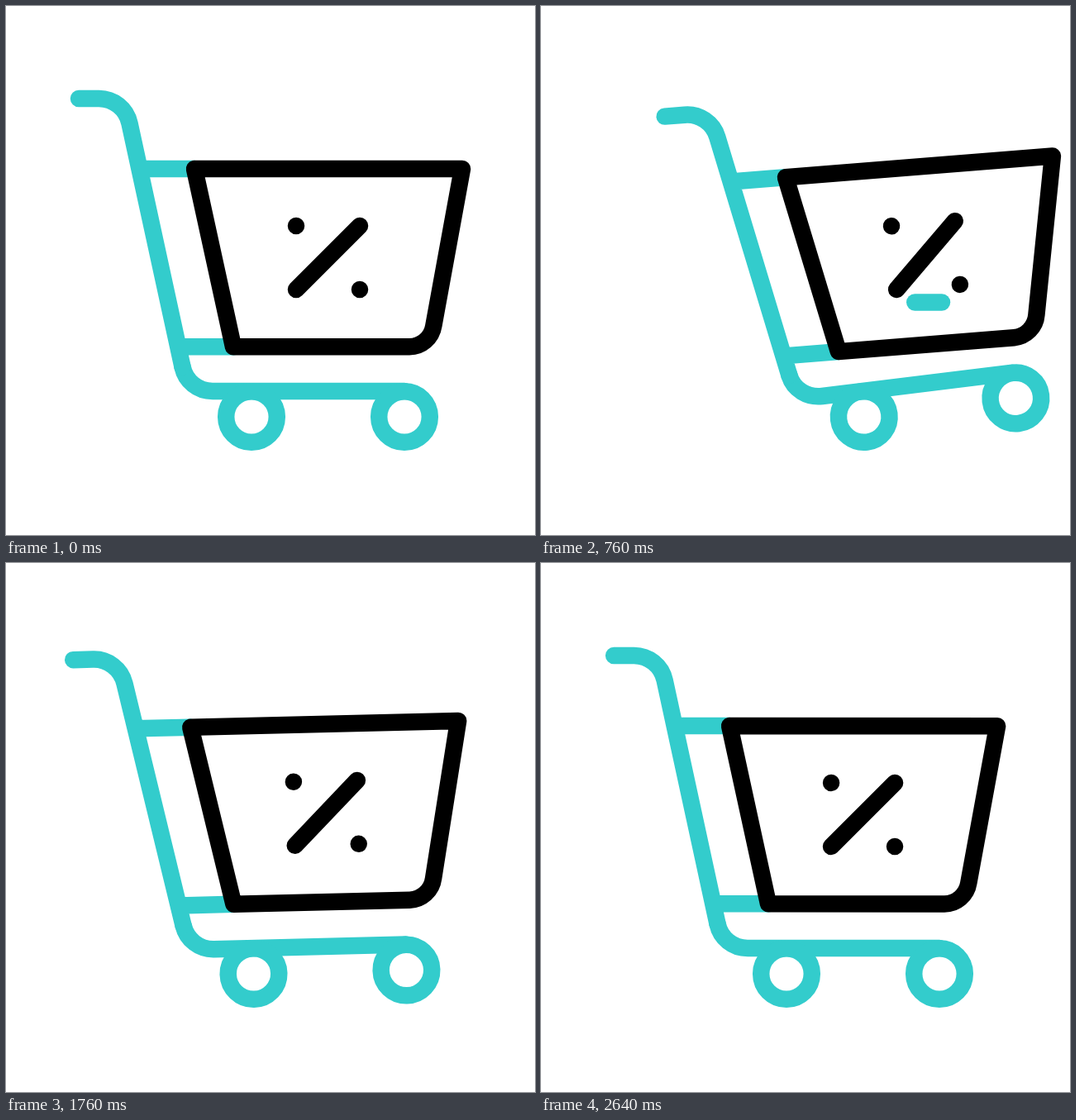
Write an HTML page with a canvas that moves like this. It is 640 px wide and 640 px high and loops after 2840 ms.

```html
<!DOCTYPE html>
<html>
<head>
<meta charset="utf-8">
<style>
  html, body { margin: 0; width: 100%; height: 100%; overflow: hidden; background: #fff; }
  canvas { display: block; }
</style>
</head>
<body>
<canvas id="stage" width="640" height="640"></canvas>
<script>
const ctx = document.getElementById('stage').getContext('2d');
const LOOP = 2840, STEP = 40, TEAL = '#33cccc', BLACK = '#000';
const WHEEL = [297, 497], HINGE = [213.5, 436.5], RAD = Math.PI / 180;

const progress = (t, from, to) => Math.min(1, Math.max(0, (t - from) / (to - from)));
const smooth = u => (1 - Math.cos(Math.PI * u)) / 2;

// Eased interpolation through [time, value] keys
function tween(t, keys) {
  let value = keys[0][1];
  for (let i = 1; i < keys.length; i++) {
    const [t0, v0] = keys[i - 1], [t1, v1] = keys[i];
    value += (v1 - v0) * smooth(progress(t, t0, t1));
  }
  return value;
}

// Fast start forward, then an accelerating return
function cartShift(t) {
  return t < 800
    ? 95 * (1 - (1 - progress(t, 40, 800)) ** 1.47)
    : 95 * (1 - progress(t, 800, 1775) ** 1.72);
}
const TILT = [[40, 0], [320, 10.9], [600, 7], [1640, 7], [1810, 0]];
const SWING = [[40, 0], [320, 3.2], [670, -2.8], [1100, 0.6], [1400, 0],
  [1800, 0], [2000, -3.2], [2210, 0], [2420, -1.6], [2660, 0]];

function stroke(color, path) {
  ctx.strokeStyle = color;
  ctx.stroke(new Path2D(path));
}

function rotateAbout([x, y], degrees) {
  ctx.translate(x, y);
  ctx.rotate(-degrees * RAD);
  ctx.translate(-x, -y);
}

function drawStreak(t) {
  if (t < 740 || t >= 1040) return;
  const head = 485 - 200 * smooth(progress(t, 640, 960)) + 29;
  const tail = 485 - 171 * smooth(progress(t, 780, 1040));
  if (head < tail) stroke(TEAL, `M${tail} 358.5H${Math.min(head, tail)}`);
}

function drawBase(swing) {
  const [x, y] = HINGE, angle = (77.7 - swing) * RAD, pull = 17.8;
  stroke(TEAL, `M${x} ${y}C${x + pull * Math.cos(angle)} ${y + pull * Math.sin(angle)} 232 466 250 466H482`);
  for (const cx of [297, 482]) {
    ctx.beginPath();
    ctx.arc(cx, 497, 30.8, 0, 2 * Math.PI);
    ctx.stroke();
  }
}

function drawBasket() {
  stroke(TEAL, `M88 112H112A38 38 0 0 1 149.5 142L${HINGE}M162 197H228M209 412.3H275`);
  stroke(BLACK, 'M228 197H552L517.3 387A30 30 0 0 1 488 412.3H275Z');
  stroke(BLACK, 'M351 343L428 266M351 266h.01M428 343h.01');
}

function draw(t) {
  const swing = tween(t, SWING);
  ctx.setTransform(1, 0, 0, 1, 0, 0);
  ctx.clearRect(0, 0, 640, 640);
  ctx.lineWidth = 20.5;
  ctx.lineCap = ctx.lineJoin = 'round';
  drawStreak(t);
  ctx.translate(cartShift(t), 0);
  rotateAbout(WHEEL, tween(t, TILT));
  drawBase(swing);
  rotateAbout(HINGE, swing);
  drawBasket();
}

function frame() {
  const t = performance.now() % LOOP;
  draw(Math.floor(t / STEP) * STEP);
  requestAnimationFrame(frame);
}
frame();
</script>
</body>
</html>
```
